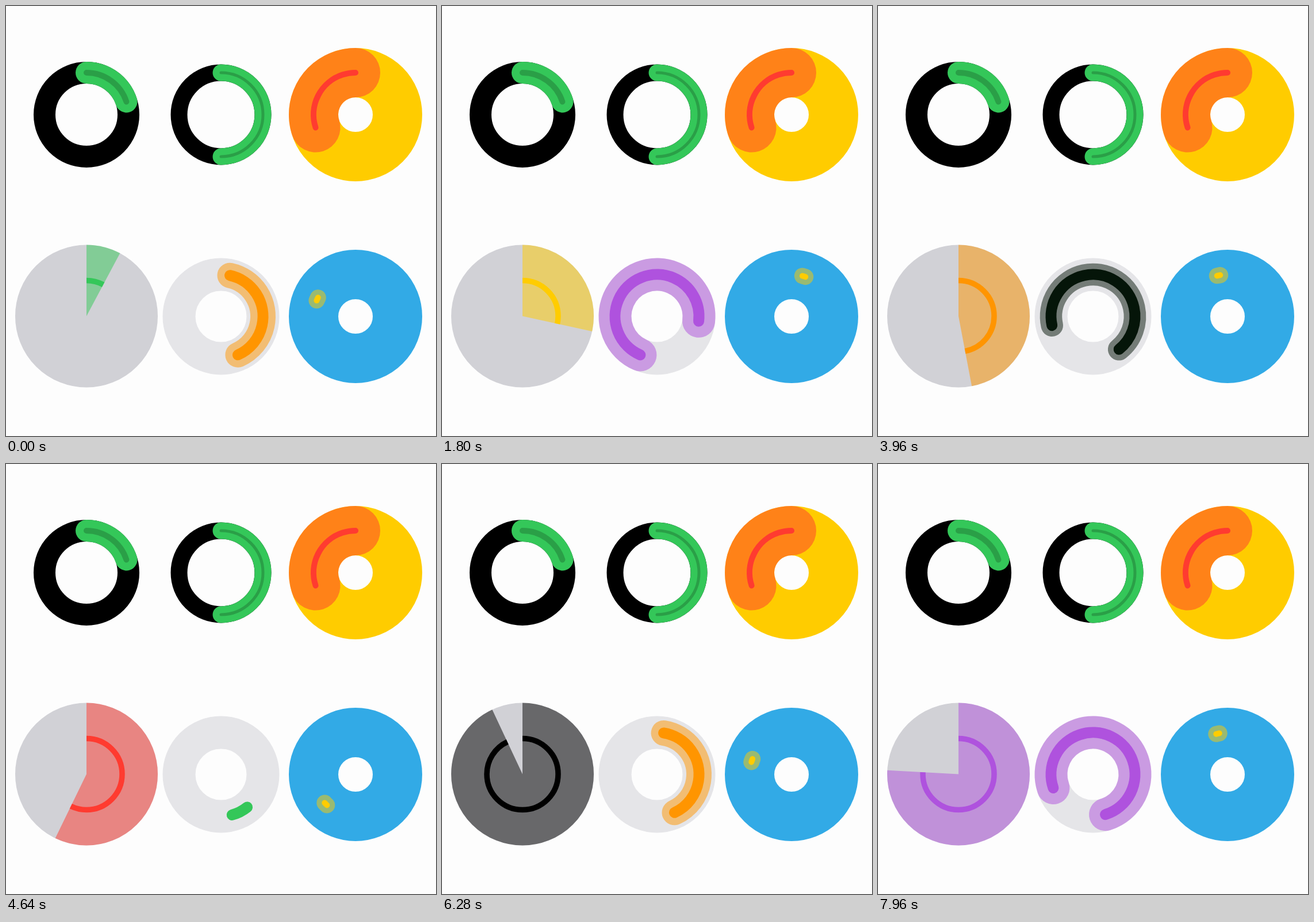
An HTML page with a canvas that plays this animation: 748 by 748 pixels, repeating every 8000 ms.

```html
<!DOCTYPE html>
<html lang="en">
<head>
<meta charset="utf-8">
<title>Circular progress indicators</title>
<style>
  html, body { margin: 0; width: 100%; height: 100%; overflow: hidden; background: #fdfdfd; }
  canvas { display: block; width: 100vmin; height: 100vmin; }
</style>
</head>
<body>
<canvas id="stage" width="748" height="748"></canvas>
<script>
const ctx = document.getElementById('stage').getContext('2d');
const LOOP = 8000;
const MID = 73; // centre-line radius shared by all ring gauges

const GREEN = [52, 199, 89], YELLOW = [255, 204, 0], ORANGE = [255, 149, 0],
      RED = [255, 59, 48], PURPLE = [175, 82, 222], BLACK = [0, 0, 0], CYAN = [50, 170, 230];

// A level is a colour band together with the width of its halo in the spinner.
const level = (color, halo) => ({ color, halo });
const green = level(GREEN, 0), yellow = level(YELLOW, 19), orange = level(ORANGE, 44),
      red = level(RED, 57), purple = level(PURPLE, 57), black = level(BLACK, 57);

// Keyframes: [start ms, level, fade ms]
const pieLevels = [[0, green, 1], [900, yellow, 300], [2000, orange, 300], [2600, red, 300],
  [3650, orange, 300], [4160, red, 300], [5140, black, 360], [7440, purple, 300]];
const spinLevels = [[0, orange, 1], [800, red, 200], [1580, purple, 200], [2460, black, 200],
  [3800, green, 500], [5110, yellow, 200], [5940, orange, 200], [6745, red, 200], [7545, purple, 200]];

// Keyframes: [ms, value in degrees]
const pieAngle = [[0, 28], [1800, 102.2], [2860, 194], [3360, 198], [3960, 169.2],
  [5320, 242.6], [6240, 334.5], [6720, 339], [8000, 271]];
const spinLength = [[262, 144], [1800, 253], [2920, 334], [3280, 360], [3800, 360],
  [4300, 0], [4330, 0], [5320, 74.5], [8000, 274.5]];

const lerp = (a, b, p) => a + (b - a) * p;
const rgba = (c, alpha = 1) => `rgba(${c.map(Math.round).join()},${alpha})`;

function track(keys, t) {
  const i = Math.max(1, keys.findIndex(k => k[0] >= t));
  const [t0, v0] = keys[i - 1], [t1, v1] = keys[i];
  return lerp(v0, v1, (t - t0) / (t1 - t0));
}

function levelAt(keys, t) {
  const i = keys.findLastIndex(k => k[0] <= t);
  const [start, to, fade] = keys[i];
  const from = i ? keys[i - 1][1] : to;
  const p = Math.min(1, (t - start) / fade);
  return {
    color: to.color.map((v, n) => lerp(from.color[n], v, p * p)),
    halo: lerp(from.halo, to.halo, p)
  };
}

// Angles are in degrees, clockwise from twelve o'clock.
function arc(x, y, r, width, style, from = 0, to = 360, cap = 'butt') {
  const rad = a => (a - 90) * Math.PI / 180;
  ctx.beginPath();
  ctx.arc(x, y, r, rad(from), rad(to));
  ctx.lineWidth = width;
  ctx.lineCap = cap;
  ctx.strokeStyle = style;
  ctx.stroke();
}

function gauge(x, y, width, base, from, to, halo, haloWidth, line, lineWidth) {
  arc(x, y, MID, width, base);
  if (haloWidth > 0) arc(x, y, MID, haloWidth, halo, from, to, 'round');
  arc(x, y, MID, lineWidth, line, from, to, 'round');
}

function pie(t) {
  const angle = track(pieAngle, t), { color } = levelAt(pieLevels, t);
  arc(140, 539.5, 62, 124, '#d1d1d6');
  arc(140, 539.5, 62, 124, rgba(color, 0.5), 0, angle);
  arc(140, 539.5, 62, 9.5, rgba(color), 0, angle);
}

function spinner(t) {
  const { color, halo } = levelAt(spinLevels, t);
  const start = (0.3584 * t - 82) % 360;
  const end = start + Math.max(0.1, track(spinLength, t));
  gauge(374, 540, 57, '#e5e5e8', start, end, rgba(color, 0.5), halo, rgba(color), 19);
}

function orbit(t) {
  const angle = 341.9 - 0.1803 * t;
  gauge(608, 540, 86, rgba(CYAN), angle - 2.2, angle + 2.2, rgba(YELLOW, 0.5), 28, rgba(YELLOW), 10);
}

function draw(t) {
  ctx.fillStyle = '#fdfdfd';
  ctx.fillRect(0, 0, 748, 748);

  const shade = rgba(BLACK, 0.2);
  gauge(140, 189, 38, rgba(BLACK), 0, 72, rgba(GREEN), 38, shade, 10);
  gauge(374, 189, 29, rgba(BLACK), 0, 180, rgba(GREEN), 29, shade, 5);
  gauge(608, 189, 86, rgba(YELLOW), 252, 360, rgba(RED, 0.5), 86, rgba(RED), 10);

  // The rotating gauges run a little slow at the start of the loop.
  const clock = t < 1800 ? lerp(262, 1800, t / 1800) : t;
  pie(t);
  spinner(clock);
  orbit(clock);
}

const begin = performance.now();
function tick() {
  draw((performance.now() - begin) % LOOP);
  requestAnimationFrame(tick);
}
tick();
</script>
</body>
</html>
```
